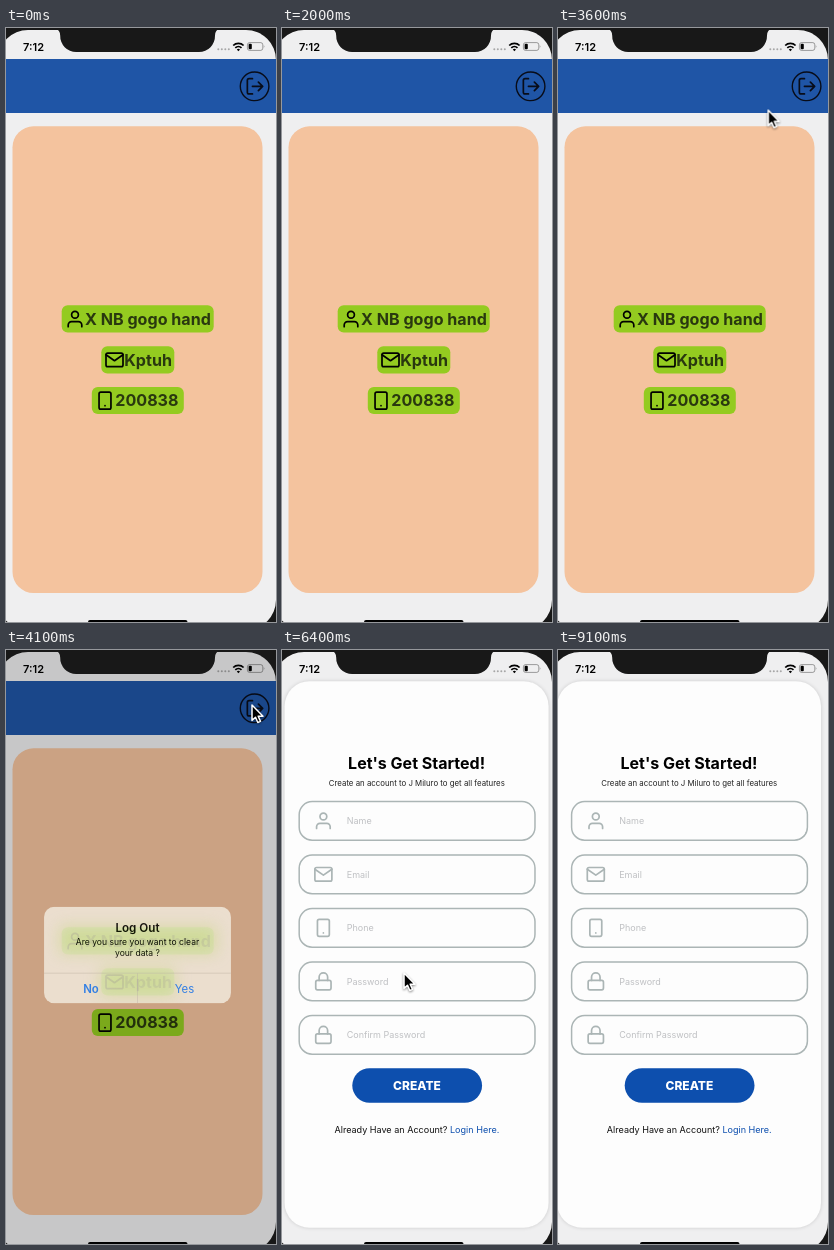
These frames come from a looping animation (270x594 px, 9.9 s). An HTML page:

```html
<!DOCTYPE html>
<html lang="en">
<head>
<meta charset="utf-8">
<title>Log out flow</title>
<style>
html, body { margin: 0; width: 100%; height: 100%; overflow: hidden; background: #181818; }
svg { display: block; width: 100%; height: 100%; }
text { font-family: Inter, Roboto, sans-serif; }
.mid { text-anchor: middle; }
.icon { fill: none; stroke: currentColor; stroke-width: 2; stroke-linecap: round; stroke-linejoin: round; }
.chip rect { fill: #94cb20; }
.chip text { font-size: 16.1px; font-weight: 700; fill: #29380f; }
.field { color: #abb5b5; }
.field rect { fill: none; stroke: #abb5b5; stroke-width: 1.5; }
.field text { font-size: 9px; fill: #bfc0c3; }

/* One loop is 9900 ms, so 1% is 99 ms */
#profile, #signup, #blank, #bar, #dim, #alert, #cursor { animation: 9.9s linear infinite; }
#profile { animation-name: profile; }
#signup { animation-name: signup; }
#blank { animation-name: blank; animation-timing-function: step-end; }
#bar { animation-name: bar; }
#dim { animation-name: dim; }
#alert { animation-name: alert; transform-origin: 131.5px 305px; }
#cursor { animation-name: move, show; animation-timing-function: ease-in-out, step-end; }
#cursor path { filter: drop-shadow(0 1px 1px rgba(0, 0, 0, .45)); }

@keyframes profile {
  0%, 59.1% { transform: none; animation-timing-function: cubic-bezier(.2,.7,.3,1); }
  65%, 100% { transform: translateX(-80px); }
}
@keyframes signup {
  0%, 59.1% { transform: translateX(278px); animation-timing-function: cubic-bezier(.2,.7,.3,1); }
  64.65% { transform: translateX(3.6px); animation-timing-function: ease-out; }
  67.2%, 100% { transform: none; }
}
@keyframes blank {
  0% { opacity: 0; }
  1.01% { opacity: 1; }
  11.11% { opacity: 0; }
  24.24% { opacity: 1; }
  33.33% { opacity: 0; }
  74.75% { opacity: 1; }
  83.84%, 100% { opacity: 0; }
}
@keyframes bar {
  0%, 1% { opacity: 0; }
  1.02%, 9.09% { opacity: 1; }
  10.6%, 24.7% { opacity: 0; }
  24.75%, 31.4% { opacity: 1; }
  33%, 75.2% { opacity: 0; }
  75.25%, 81.9% { opacity: 1; }
  83.5%, 100% { opacity: 0; }
}
@keyframes dim {
  0%, 39.9% { opacity: 0; }
  41.41% { opacity: .17; }
  43.43%, 55.5% { opacity: .2; }
  56.57% { opacity: .14; }
  58.6%, 100% { opacity: 0; }
}
@keyframes alert {
  0%, 39.9% { opacity: 0; transform: scale(1.15); }
  41.41% { opacity: .87; transform: scale(1.033); }
  43.43%, 55.5% { opacity: 1; transform: none; }
  56.57% { opacity: .54; transform: none; }
  58.1%, 100% { opacity: 0; transform: none; }
}
@keyframes move {
  0%, 33.33% { transform: translate(138px, 137px); }
  38.4%, 44.4% { transform: translate(246px, 55px); }
  50.5%, 57.2% { transform: translate(182px, 335px); }
  64.2%, 100% { transform: translate(122px, 323px); }
}
@keyframes show {
  0% { opacity: 0; }
  28.28% { opacity: 1; }
  74.75%, 100% { opacity: 0; }
}
</style>
</head>
<body>
<svg viewBox="0 0 270 594" preserveAspectRatio="none">
  <defs>
    <g id="user" class="icon"><path d="M20 21v-2a4 4 0 0 0-4-4H8a4 4 0 0 0-4 4v2"/><circle cx="12" cy="7" r="4"/></g>
    <g id="mail" class="icon"><rect x="2" y="4" width="20" height="16" rx="2"/><path d="M22 6l-10 7L2 6"/></g>
    <g id="phone" class="icon"><rect x="5" y="2" width="14" height="20" rx="2"/><path d="M12 18h.01"/></g>
    <g id="lock" class="icon"><rect x="3" y="11" width="18" height="11" rx="2"/><path d="M7 11V7a5 5 0 0 1 10 0v4"/></g>
    <linearGradient id="foot" x2="0" y2="1"><stop stop-color="#fff"/><stop offset="1" stop-color="#f5f5f5"/></linearGradient>
    <filter id="soft" x="-10%" y="-10%" width="120%" height="120%"><feGaussianBlur stdDeviation="2"/></filter>
    <filter id="frost" x="-30%" y="-30%" width="160%" height="160%"><feGaussianBlur stdDeviation="7"/></filter>
    <clipPath id="sheet"><rect x="41" y="258.3" width="181" height="93.4" rx="10"/></clipPath>
  </defs>

  <rect width="270" height="594" fill="#efeff0"/>

  <g id="profile">
    <rect x="-8" width="278" height="594" fill="#efeff0"/>
    <rect x="-8" y="31" width="278" height="54" fill="#1f55a6"/>
    <circle cx="248.6" cy="58.3" r="14.3" fill="none" stroke="#080c18" stroke-width="1.4"/>
    <g class="icon" transform="translate(238.8 48.1) scale(.85)" color="#080c18">
      <path d="M9 21H5a2 2 0 0 1-2-2V5a2 2 0 0 1 2-2h4M16 17l5-5-5-5M21 12H9"/>
    </g>
    <rect x="6.5" y="98.3" width="250" height="466.7" rx="21" fill="#f4c39e"/>
    <g id="chips"></g>
  </g>

  <g id="signup">
    <rect x="-8" width="278" height="594" fill="#efeff0"/>
    <rect x="-1" y="31.5" width="264" height="546" rx="25" opacity=".16" filter="url(#soft)"/>
    <rect x="-1" y="31.2" width="264" height="546.5" rx="25" fill="#fdfdfd"/>
    <text class="mid" x="131" y="118.7" font-size="16" font-weight="700">Let's Get Started!</text>
    <text class="mid" x="131.2" y="136" font-size="7.85" fill="#222">Create an account to J Miluro to get all features</text>
    <g id="fields"></g>
    <rect x="66.7" y="418.2" width="129.8" height="34.6" rx="17.3" fill="#0d4fae"/>
    <text class="mid" x="131.4" y="439.8" font-size="12" font-weight="800" fill="#fff">CREATE</text>
    <text class="mid" x="131.3" y="483.3" font-size="9.05" fill="#111">Already Have an Account? <tspan fill="#0d4fae">Login Here.</tspan></text>
  </g>

  <g id="blank">
    <rect width="270" height="594" fill="#fff"/>
    <rect y="568" width="270" height="26" fill="url(#foot)"/>
  </g>

  <g id="bar">
    <rect width="270" height="51.4" fill="#0f4f02"/>
    <text id="count" class="mid" x="131" y="44.8" font-size="8" fill="#c6dac1"></text>
  </g>

  <g id="status">
    <text x="17" y="22.5" font-size="11" font-weight="600">7:12</text>
    <path d="M212.3 21.2h.01M215.8 21.2h.01M219.3 21.2h.01M222.8 21.2h.01" stroke="#000" stroke-opacity=".3" stroke-width="2" stroke-linecap="round"/>
    <g fill="none" stroke="#000" stroke-width="1.7">
      <path d="M227.2 17.5a7.2 7.2 0 0 1 10.4 0M229.3 19.8a4.4 4.4 0 0 1 6.2 0"/>
    </g>
    <path d="M232.4 23.2l-1.6-1.7a2.3 2.3 0 0 1 3.2 0z"/>
    <rect x="241.4" y="14.6" width="15.4" height="7.8" rx="2.2" fill="none" stroke="#000" stroke-opacity=".4" stroke-width=".9"/>
    <rect x="242.6" y="15.8" width="3.2" height="5.4" rx="1"/>
    <path d="M257.8 17.1q1.4 1.4 0 2.8z" fill-opacity=".4"/>
  </g>

  <rect id="dim" width="270" height="594"/>

  <g id="alert">
    <g clip-path="url(#sheet)">
      <rect x="41" y="258" width="181" height="94" fill="#f0e7da"/>
      <g fill="#cfe08f" opacity=".6" filter="url(#frost)">
        <rect x="56" y="277" width="152" height="27"/>
        <rect x="95" y="318" width="73" height="27"/>
      </g>
    </g>
    <path d="M41 322.6h181M131.5 322.6v29" stroke="#cfc6b9" stroke-width=".7"/>
    <g class="mid">
      <text x="131.5" y="282.3" font-size="11.3" font-weight="600">Log Out</text>
      <text x="131.5" y="295.6" font-size="8.3">Are you sure you want to clear</text>
      <text x="131.5" y="306" font-size="8.3">your data ?</text>
      <g font-size="11" fill="#1c7af2">
        <text x="86.5" y="341.4" font-weight="600">No</text>
        <text x="177" y="341.4">Yes</text>
      </g>
    </g>
  </g>

  <g id="frame" fill="#181818">
    <path fill-rule="evenodd" d="M-20-20H290V620H-20ZM22 2H240a30 30 0 0 1 30 30V572a30 30 0 0 1-30 30H22a30 30 0 0 1-30-30V32a30 30 0 0 1 30-30Z"/>
    <path d="M49 0q5.2 2 5.2 7.5a16 16 0 0 0 16 16.5H193a16 16 0 0 0 16-16.5q0-5.5 5.2-7.5Z"/>
    <rect x="82" y="592" width="99.5" height="4" rx="2" fill="#000"/>
  </g>

  <g id="cursor">
    <path d="M0 0V15.4L3.5 12.2 5.8 17.5 8.5 16.4 6.2 11.2H11Z" stroke="#fff" stroke-width="1.5" stroke-linejoin="round"/>
  </g>
</svg>
<script>
const $ = id => document.getElementById(id);
const icon = (name, x, y) =>
  `<use href="#${name}" transform="translate(${x - 10.2} ${y - 10.2}) scale(.85)"/>`;

// Chips: icon, label, left, top, width, icon centre, text start
$('chips').innerHTML = [
  ['user', 'X NB gogo hand', 55.7, 277.3, 152, 69, 79],
  ['mail', 'Kptuh', 95.3, 318.2, 73, 108.5, 118.3],
  ['phone', '200838', 85.8, 358.9, 92, 99, 109.3]
].map(([name, label, x, y, w, ix, tx]) => `<g class="chip">
  <rect x="${x}" y="${y}" width="${w}" height="27.2" rx="6"/>
  ${icon(name, ix, y + 13.7)}<text x="${tx}" y="${y + 19.4}">${label}</text></g>`).join('');

$('fields').innerHTML = [
  ['user', 'Name'], ['mail', 'Email'], ['phone', 'Phone'],
  ['lock', 'Password'], ['lock', 'Confirm Password']
].map(([name, label], i) => {
  const y = 151.6 + i * 53.5;
  return `<g class="field"><rect x="13.6" y="${y}" width="235.8" height="38.6" rx="13"/>
    ${icon(name, 37.8, y + 19.2)}<text x="61.2" y="${y + 22.6}">${label}</text></g>`;
}).join('');

// Bundle counter restarts with every reload
const LOOP = 9900, TOTAL = 4280, reloads = [7450, 2450, 100];
let begin;
function tick(now) {
  begin ??= now;
  const t = (now - begin) % LOOP;
  const start = reloads.find(r => t >= r) ?? 0;
  const part = Math.min(1, (t - start) / 500);
  $('count').textContent =
    `Downloading JavaScript bundle ${Math.floor(part * 100)}% (${Math.floor(part * TOTAL)}/${TOTAL})...`;
  requestAnimationFrame(tick);
}
requestAnimationFrame(tick);
</script>
</body>
</html>
```
